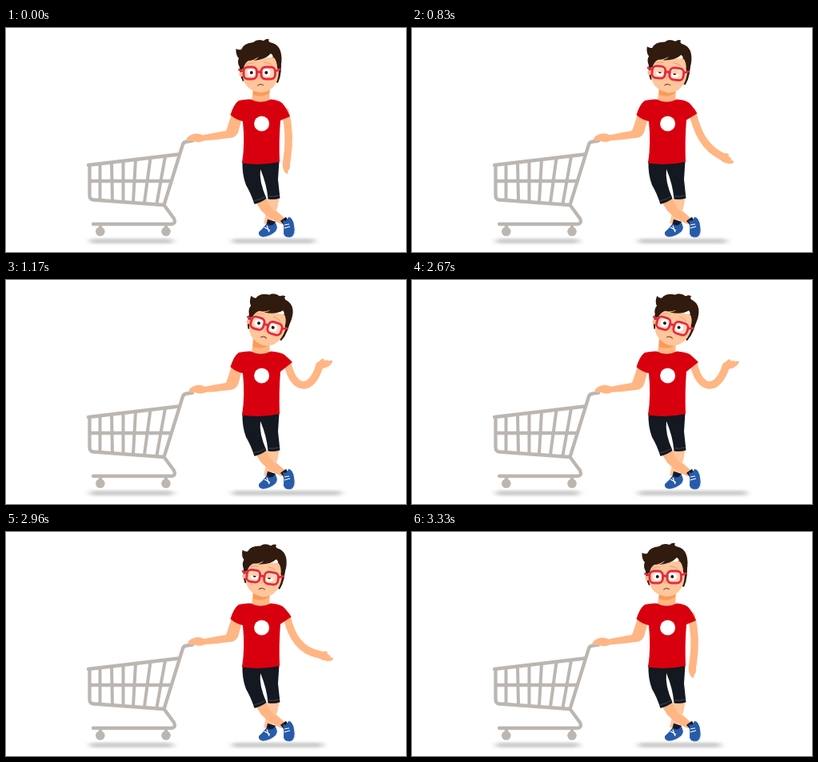
Animation, 500 px wide and 281 px high, one loop 3830 ms. Source, as an HTML page:

```html
<!DOCTYPE html>
<html lang="en">
<head>
<meta charset="utf-8">
<title>Shopper with an empty cart</title>
<style>
  html, body { margin: 0; width: 100%; height: 100%; overflow: hidden; background: #fff; }
  svg { display: block; width: 100%; height: 100%; }
  .skin { fill: #ffb684; }
  .face { fill: #ffc59b; }
  .hair { fill: #301b0e; }
  .cart { fill: none; stroke: #bcb6b1; stroke-width: 4.3; stroke-linecap: round; stroke-linejoin: round; }
  .frame { fill: none; stroke: #e22a42; stroke-width: 2.8; stroke-linecap: round; }
  .shadow { fill: #cecece; filter: url(#soft); }
  #freeArm { fill: none; stroke: #ffb684; stroke-width: 9.5; stroke-linecap: round; }
</style>
</head>
<body>
<svg viewBox="0 0 500 281">
  <defs>
    <filter id="soft" x="-20%" y="-150%" width="140%" height="400%">
      <feGaussianBlur stdDeviation="4 1.7"/>
    </filter>
    <clipPath id="eyes">
      <circle cx="306.6" cy="56" r="5"/>
      <circle cx="325.8" cy="56" r="5"/>
    </clipPath>
  </defs>

  <rect class="shadow" x="105" y="264" width="104" height="6.400" rx="3.200"/>
  <rect class="shadow" id="bodyShadow" x="283" y="264" height="6.400" rx="3.200"/>

  <g class="cart">
    <path d="M233 141.500 L226 142.500 Q222 143 221 146 L197.500 222 L210 239 Q213 246 206 246 H109"/>
    <path d="M103 172 L216 158.500 M104.500 173 V210 Q104.500 215 109 215.500 L197 222 M105 192 H206"/>
    <path stroke-width="4" d="M117.500 171 V215 M132 169 L133 216 M146.500 167 V217 M162 165 L159 218 M180.500 163 L173 219 M199 161 L188.500 220"/>
    <path d="M118 247 V254 M200 247 V254"/>
  </g>
  <g fill="#bcb6b1"><circle cx="117.800" cy="255.300" r="5.800"/><circle cx="200" cy="255.300" r="5.800"/></g>

  <!-- legs and shoes -->
  <g>
    <path class="face" d="M327 213 H341 Q340 225 335 235 L331 247 L322 245 Q326 231 327 213Z"/>
    <path class="skin" d="M312 218 L325 213 Q331 225 341 232 L351 241 L344 246 Q328 239 319 229Z"/>
    <path class="face" d="M327 214 H341 Q340 225 337 231 Q330 225 326 216Z"/>
    <path fill="#151a2b" d="M327 240 L337 243 L333 250 L325 248Z M343 242 L350 237 L354 244 L347 247Z"/>
    <path fill="#e9edf5" d="M316 258 Q316 263 323 263 Q333 262 339 254 L337 249Z M348 261 Q356 265 361 260 Q364 251 358 242Z"/>
    <path fill="#285ca9" d="M326 245 Q328 249 333 247 Q336 246 336 243 Q341 250 337 255 Q329 262 321 262 Q315 261 316 256 Q321 252 326 245Z"/>
    <path fill="#285ca9" d="M346 241 Q351 244 353 237 Q359 238 360 248 Q362 258 357 262 Q349 264 347 258 Q348 250 346 241Z"/>
    <path stroke="#fff" stroke-width="1.200" fill="none" d="M323 250 L330 254 M326 248 L329 256 M348 247 L354 246 M348 251 L355 249"/>
    <path fill="#141820" d="M295.500 167 H341.500 L340 190 L342.500 213.500 Q335 216 327.500 214.500 Q326 196 318 177 Q316 192 325.500 214 Q319 219 310.500 221 Q306 207 300 197 Q295 184 295.500 167Z"/>
    <path stroke="#3b4456" fill="none" d="M309 217 Q317 216 325 211 M327 211 Q335 212 342 210"/>
  </g>

  <path id="freeArm"/>
  <g id="hand">
    <path class="skin" d="M-4 -2 Q-6 5 -4.500 10 Q-3 15 0 17 Q2.500 17 2 13 Q4.500 11 4.300 6 L4 -2Z"/>
    <path id="thumb" class="skin" d="M2 -1 Q6 1 7 6 Q6 8 3 7Z"/>
  </g>

  <path id="pushArm" class="skin"/>
  <path class="skin" d="M309 74 H329.500 V92 Q319 97 307 92Z"/>
  <path fill="#f89c58" d="M309 74 H329.500 V81 Q321 88 309 84Z"/>
  <path id="shirt" fill="#d8000f"/>
  <circle cx="319.600" cy="120" r="9.500" fill="#fff"/>

  <g id="head">
    <path class="hair" d="M292 40 Q291 58 296 67 L302 64 V40Z M343 36 Q346 56 340 69 L333 66 V36Z"/>
    <circle class="skin" cx="294.500" cy="58" r="3"/>
    <path class="face" d="M295 40 L340 36 Q343 60 337 70 Q330 81 319.500 81 Q304 80 298 68 Q294 58 295 40Z"/>
    <path fill="#ffb584" d="M317 58 Q320 64 316 65 Q314 64 315 63Z"/>
    <path fill="none" stroke="#dda27a" d="M300 46 Q305 43 310 44 M322 43 Q328 43 332 46"/>
    <path fill="none" stroke="#67351f" stroke-linecap="round" d="M314.500 72 Q318 69 321.500 71.500"/>
    <path fill="#ffd6b6" d="M299 50 H312 V63 H299Z M321 50 H335 V63 H321Z"/>
    <g clip-path="url(#eyes)">
      <path fill="#fff" d="M300 50 H333 V62 H300Z"/>
      <circle cx="306.800" cy="56" r="2" fill="#21150f"/>
      <circle cx="325.300" cy="56" r="2" fill="#21150f"/>
      <rect id="lids" x="300" y="50" width="33" fill="#ffcfaa"/>
    </g>
    <path class="hair" d="M294 52 L291 47 Q289 42 291 38 Q287 34 287.500 26 Q291 28 294 27 Q297 19 309 18 Q314 13 322 16 Q325 13 329 14 Q327 16 330 18 Q342 20 344 33 Q346 44 341 53 L339 50 Q339 41 334 36 Q333 33 331 32 Q324 40 309 41 Q314 39 316 36 Q309 41 303 41 Q298 44 297 51Z"/>
    <g class="frame">
      <rect x="297" y="49" width="16.500" height="15" rx="5.500"/>
      <rect x="319" y="49" width="17.500" height="15" rx="5.500"/>
      <path d="M313.500 56 Q316 54 319 56 M296.500 54 L291.500 52.500 M337 54 L342.500 52"/>
    </g>
  </g>
</svg>
<script>
  const LOOP = 3830, STEP = 41.8;
  const part = id => document.getElementById(id);
  const clamp = v => Math.max(0, Math.min(1, v));

  // Progress in discrete steps, already one step in at `start`.
  const stepped = (t, start, count) =>
    clamp((Math.floor((t - start + 8) / STEP) + 1) / count);

  function shrug(t) {
    if (t < 2670) return 1 - (1 - stepped(t, 750, 11)) ** 2;
    return 1 - stepped(t, 2670, 12) ** 2;
  }

  function lidClosure(t) {
    const close = start => stepped(t, start, 2);
    return close(540) - stepped(t, 960, 3) + close(2900) - stepped(t, 3250, 3);
  }

  const outline = (id, d) => part(id).setAttribute('d', d);

  // The wrist swings around the shoulder while the elbow bends smoothly.
  function drawFreeArm(p) {
    const swing = p ** 1.3;
    const angle = (1 + 89 * swing) * Math.PI / 180;
    const reach = 59 + 40.5 * p - 57.5 * p * p;
    const shoulderX = 349 + 3 * p;
    const wristX = 350 + reach * Math.sin(angle);
    const wristY = 107 + reach * Math.cos(angle);
    outline('freeArm', `M${shoulderX} 105 C${353 + 7 * p} ${121 + 20 * p}
      ${355 + 28 * swing} ${142 + 36 * p * (1 - p) - 2 * p} ${wristX} ${wristY}`);
    part('hand').setAttribute('transform',
      `translate(${wristX} ${wristY}) rotate(${2 - 108 * p ** 0.72})`);
    part('thumb').setAttribute('opacity', clamp(p * 4));
  }

  function draw(t) {
    const p = shrug(t);
    part('bodyShadow').setAttribute('width', 103 + 33 * p * p);
    drawFreeArm(p);

    const x = 3 * p, y = -0.7 * p;
    outline('pushArm', `M282 108 Q278 121 275 129 Q262 131 ${246 + x} ${134.5 + y}
      Q${239 + x} ${131 + y} ${233 + x} ${133.5 + y} Q${226 + x} ${136 + y} ${225.5 + x} ${140 + y}
      Q${227 + x} ${143 + y} ${232 + x} ${141.5 + y} Q${241 + x} ${145 + y} ${247 + x} ${141.5 + y}
      Q266 140 283 137.5 Q289 136 291 128 L295 113Z`);

    outline('shirt', `M306 89.5 Q318 96 331 89.5 Q${340 + p} 90 ${345 + 2 * p} ${94 - p}
      Q${350 + 2 * p} ${99 - 2 * p} ${355 + 3 * p} ${111 - 8 * p}
      L343 ${116 - p} Q341 140 342 168
      Q319 173 295 169.5 Q299 145 296 117 Q287 115 280.5 109
      Q285 95 291 91 Q299 89 306 89.5Z`);

    part('head').setAttribute('transform', `rotate(${17 * p ** 1.4} 317.5 86)`);
    part('lids').setAttribute('height', 6.2 * clamp(lidClosure(t)));
  }

  function tick(now) {
    draw(now % LOOP);
    requestAnimationFrame(tick);
  }
  draw(0);
  requestAnimationFrame(tick);
</script>
</body>
</html>
```
